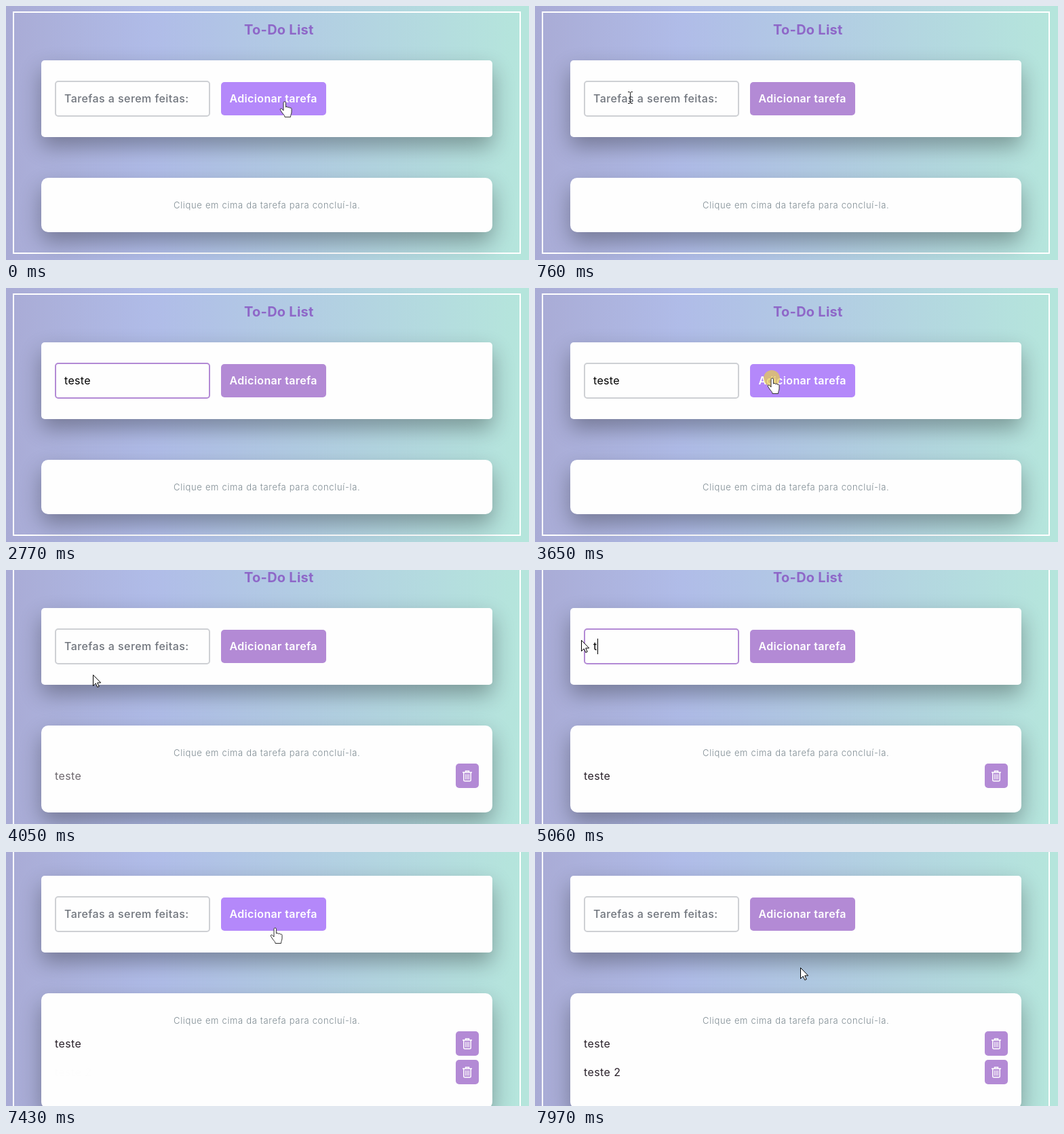
These frames come from a looping animation (771 by 374 pixels, 8 s). An HTML page:

```html
<!DOCTYPE html>
<html lang="pt-BR">
<head>
<meta charset="utf-8">
<title>To-Do List</title>
<style>
  html, body { margin: 0; width: 100%; height: 100%; overflow: hidden; }
  body {
    position: relative;
    font: 400 16px/24px Inter, "Noto Sans", sans-serif;
    background: linear-gradient(90deg, #a9abd5, #b0bce8 28%, #b5e5dc 98%);
  }
  div, svg, h1 { position: absolute; box-sizing: border-box; margin: 0; white-space: pre; }
  #page { left: 0; top: 0; width: 771px; height: 374px; }
  #frame { left: 10px; top: 8px; width: 749px; height: 357px; border: 2px solid #fff; }
  h1 {
    left: 351px; top: 20px; color: #8e67c8;
    font-size: 20px; line-height: 30px; font-weight: 700; letter-spacing: .25px;
  }
  .card {
    left: 52px; width: 665px; background: #fefefe;
    box-shadow: 0 14px 32px rgba(0, 0, 0, .32);
  }
  #form { top: 80px; height: 113px; border-radius: 5px; }
  #list { top: 253px; height: 80px; border-radius: 10px; }
  #field {
    left: 20px; top: 30px; width: 229px; height: 53px;
    border: 2px solid #ced0d4; border-radius: 5px;
  }
  #field.focus { border-color: #b38ad5; }
  #text { left: 12px; top: 12px; color: #000; letter-spacing: .3px; }
  #text.empty { color: #70757d; font-weight: 500; letter-spacing: .43px; }
  #caret { top: 13px; width: 1px; height: 23px; background: #000; }
  #add {
    left: 265px; top: 32px; width: 155px; height: 49px; border-radius: 5px;
    padding-left: 12.5px; background: #b38ad5; color: #fff;
    font-weight: 600; line-height: 49px; letter-spacing: .35px;
  }
  #add.hover { background: #b488fa; }
  #hint {
    left: 195px; top: 30px; color: #7e8b92;
    font-size: 13px; line-height: 20px; font-weight: 300; letter-spacing: .67px;
  }
  .item { left: 20px; width: 625px; height: 36px; }
  .item span { position: absolute; left: 0; top: 6px; color: #2b222b; letter-spacing: .4px; }
  .bin { right: 0; top: 0; width: 34px; height: 36px; border-radius: 5px; background: #b38ad5; }
  .bin svg { left: 9px; top: 10px; }
  #dot { width: 24px; height: 24px; border-radius: 50%; background: rgba(232, 208, 70, .68); }
  #cursor { left: 0; top: 0; overflow: visible; }
  #cursor path { stroke-linejoin: round; }
</style>
</head>
<body>
<div id="page">
  <div id="frame"></div>
  <h1>To-Do List</h1>
  <div id="form" class="card">
    <div id="field"><div id="text"></div><div id="caret"></div></div>
    <div id="add">Adicionar tarefa</div>
  </div>
  <div id="list" class="card">
    <div id="hint">Clique em cima da tarefa para concluí-la.</div>
  </div>
</div>
<div id="dot"></div>
<svg id="cursor" width="20" height="26">
  <path id="arrow" fill="#fff" stroke="#000" d="M.5.5V16.5L4.2 13 6.8 18.5 9.2 17.4 6.7 12H11.7Z"/>
  <path id="hand" fill="#fff" stroke="#333" transform="translate(-6.5 -1)"
    d="M5.5 14V2.5a1.7 1.7 0 0 1 3.4 0V9c.3-1 3-1 3.2.6.4-.9 2.7-.8 2.9.7.6-.7 2.5-.4 2.5 1.2V16c0 3-1.5 4-1.5 7.5H7.5c0-2.5-2-3.5-4-6.5L1 13.2c-1-1.6.8-3 2.3-1.7Z"/>
  <path id="beam" fill="none" stroke="#222" d="M-3-8.5H-1L.5-7.5 2-8.5H4M.5-7.5V7.5M-3 8.5H-1L.5 7.5 2 8.5H4"/>
</svg>
<script>
const LOOP = 8000;
const $ = id => document.getElementById(id);

// time, x, y of the pointer
const path = [
  [0, 410, 141], [190, 410, 141], [500, 270, 138], [800, 120, 135], [970, 114, 134],
  [1040, 47, 137], [2600, 47, 137], [2770, 112, 104],
  [3090, 237, 25], [3450, 349, 133], [3780, 349, 133], [3850, 290, 140],
  [4050, 128, 154], [4200, 122, 118], [4460, 122, 117], [4530, 68, 103],
  [6500, 68, 103], [6880, 490, 162], [7200, 396, 112], [7430, 396, 112],
  [7700, 399, 119], [7930, 399, 119], [7970, 391, 170], [LOOP, 391, 170]
];
const away = [2770, 3090];
const clicks = [[830, 950], [3650, 3780], [4210, 4330], [7290, 7430]];
const focus = [[940, 3650], [4340, 7290]];
// time, text in the field
const typing = [
  [0, ''], [1640, 't'], [1710, 'te'], [1910, 'tes'], [2010, 'test'], [2110, 'teste'], [3780, ''],
  [5060, 't'], [5130, 'te'], [5330, 'tes'], [5400, 'test'], [5540, 'teste'],
  [5940, 'teste '], [6140, 'teste 2'], [7430, '']
];
const items = [['teste', 3780], ['teste 2', 7430]].map(([label, at], i) => {
  const row = document.createElement('div');
  row.className = 'item';
  row.style.top = 56 + i * 42 + 'px';
  row.innerHTML = `<span>${label}</span><div class="bin"><svg width="16" height="17"
    fill="none" stroke="#fff" stroke-width="1.5"><path d="M1 3H15M5.5 3V1H10.5V3M2.8 3.5V14.5
    Q2.8 15.8 4.2 15.8H11.8Q13.2 15.8 13.2 14.5V3.5"/><path stroke-width="1.1"
    d="M5.7 5.5V13.5M8 5.5V13.5M10.3 5.5V13.5"/></svg></div>`;
  $('list').append(row);
  return { row, label: row.firstChild, at };
});

const within = (t, [a, b]) => t >= a && t < b;
const inBox = (x, y, l, top, w, h) => x >= l && x < l + w && y >= top && y < top + h;
const show = (el, on) => { el.style.visibility = on ? 'visible' : 'hidden'; };

function pointer(t) {
  const i = path.findIndex(p => p[0] > t);
  const [t0, x0, y0] = path[i - 1], [t1, x1, y1] = path[i];
  const k = (t - t0) / (t1 - t0);
  return [x0 + (x1 - x0) * k, y0 + (y1 - y0) * k];
}

function draw(t) {
  // the page is centred, so it grows upwards and downwards alike
  const count = items.filter(i => t >= i.at).length;
  const shift = [0, 24, 45][count];
  $('page').style.transform = `translateY(${-shift}px)`;
  $('frame').style.height = 357 + shift * 2 + 'px';
  $('list').style.height = [80, 128, 170][count] + 'px';
  for (const { row, label, at } of items) {
    row.style.display = t >= at ? '' : 'none';
    label.style.opacity = Math.min(1, Math.max(0, (t - at) / 400));
  }

  const [typedAt, text] = typing.filter(s => s[0] <= t).pop();
  const span = focus.find(f => within(t, f));
  const box = $('text');
  const label = text || 'Tarefas a serem feitas:';
  if (box.textContent !== label) box.textContent = label;
  box.className = text ? '' : 'empty';
  $('field').className = span ? 'focus' : '';
  const since = span ? t - Math.max(span[0], typedAt) : 0;
  show($('caret'), span && Math.floor(since / 500) % 2 === 0);
  $('caret').style.left = 12 + (text ? box.offsetWidth : 0) + 'px';

  const [x, y] = pointer(t);
  const seen = !within(t, away);
  const onAdd = inBox(x, y, 317, 112 - shift, 155, 49);
  const onField = inBox(x, y, 72, 110 - shift, 229, 53);
  $('add').className = seen && onAdd ? 'hover' : '';
  show($('arrow'), seen && !onAdd && !onField);
  show($('hand'), seen && onAdd);
  show($('beam'), seen && onField);
  $('cursor').style.transform = `translate(${Math.round(x)}px, ${Math.round(y)}px)`;
  $('dot').style.transform = `translate(${x - 12}px, ${y - 12}px)`;
  show($('dot'), clicks.some(c => within(t, c)));
}

const start = performance.now();
function tick() {
  draw((performance.now() - start) % LOOP);
  requestAnimationFrame(tick);
}
tick();
</script>
</body>
</html>
```
